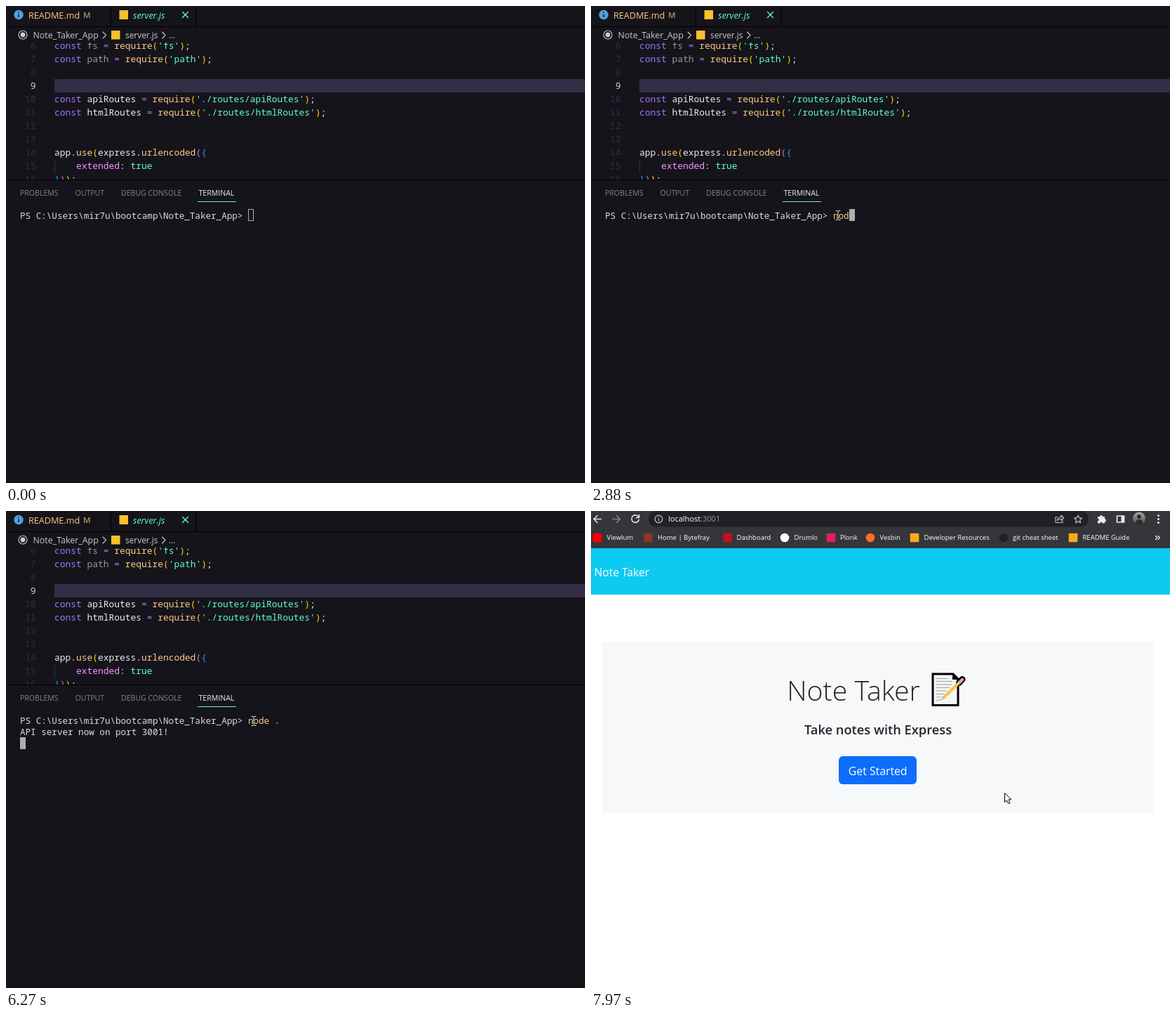
Animation of 825 by 679 pixels, one loop 8000 ms. Source, as an HTML page:

```html
<!DOCTYPE html>
<html lang="en">
<head>
<meta charset="utf-8">
<title>Note Taker demo</title>
<style>
html, body { margin: 0; width: 100%; height: 100%; overflow: hidden; background: #15141b; }
svg { display: block; width: 100vw; height: 100vh; }
text { white-space: pre; font-family: "Open Sans", "Noto Sans", sans-serif; }
.mono { font-family: "Noto Sans Mono", "DejaVu Sans Mono", monospace; font-weight: 500; }
.line { fill: none; stroke-linecap: round; stroke-linejoin: round; }
#code { font-size: 12.92px; }
#term { font-size: 12.6px; fill: #dddcde; }
#ibeam { mix-blend-mode: difference; }
</style>
</head>
<body>
<svg viewBox="0 0 825 679" preserveAspectRatio="none">
  <defs>
    <clipPath id="pane"><rect y="52" width="825" height="195"/></clipPath>
    <linearGradient id="photo" x2="0" y2="1"><stop stop-color="#a9a5a6"/><stop offset="1" stop-color="#5b4a4c"/></linearGradient>
  </defs>

  <g id="editor">
    <rect width="825" height="679" fill="#15141b"/>
    <path d="M0 29.5H825M149.5 0V29M270.5 0V29M0 247.5H825" stroke="#000"/>
    <circle cx="18" cy="12.5" r="6.7" fill="#4ea1e0"/>
    <path d="M18 11.5V16M18 8.3V9.8" stroke="#15141b" stroke-width="1.5"/>
    <g font-size="12.6">
      <text x="32" y="18" fill="#ffca85">README.md</text>
      <text x="110" y="17" font-size="11.5" font-weight="600" fill="#b59265">M</text>
      <text x="181" y="18" fill="#61ffca" font-style="italic">server.js</text>
    </g>
    <path d="M161.5 6h12.5v13h-12.5zM150 35h12.5v12.5H150z" fill="#fbc02d"/>
    <path class="line" d="M251.5 8.5l8 8m0-8l-8 8" stroke="#61ffca" stroke-width="1.3"/>
    <g font-size="11.9" fill="#cbcacc">
      <circle cx="24" cy="41" r="6" fill="none" stroke="#b9b8ba" stroke-width="1.2"/>
      <circle cx="24" cy="41" r="3.4"/>
      <text x="38.5" y="46" font-size="12.4">Note_Taker_App</text>
      <text x="170" y="46">server.js</text>
      <text x="232" y="46">...</text>
      <path class="line" d="M138 37l4.5 4.5l-4.5 4.5M222.5 37l4.5 4.5l-4.5 4.5" stroke="#cbcacc" stroke-width="1.1"/>
    </g>

    <g id="code" clip-path="url(#pane)">
      <rect x="69" y="104" width="756" height="19" fill="#312e46"/>
      <path d="M69.5 219V238" stroke="#34313f"/>
    </g>

    <g font-size="10.55" fill="#85848a">
      <text x="20" y="270">PROBLEMS</text>
      <text x="98.5" y="270">OUTPUT</text>
      <text x="164" y="270">DEBUG CONSOLE</text>
      <text x="274.5" y="270" fill="#edecee">TERMINAL</text>
    </g>
    <path d="M273 278.5H328" stroke="#61ffca"/>
    <g id="term">
      <rect id="caret" width="7" height="16" stroke="#aeafad"/>
      <text class="mono" x="20" y="302.5">PS C:\Users\mir7u\bootcamp\Note_Taker_App> <tspan id="cmd" fill="#ffca85"></tspan><tspan id="arg"></tspan></text>
      <text id="reply" class="mono" x="20" y="319">API server now on port 3001!</text>
    </g>
    <path id="ibeam" class="line" d="M-3 -6.5h2l1 1l1 -1h2M0 -5.5V5.5M-3 6.5h2l1 -1l1 1h2" stroke="#fff"/>
  </g>

  <g id="browser">
    <rect width="825" height="679" fill="#fff"/>
    <rect width="825" height="53" fill="#35363a"/>
    <rect x="82" y="0" width="627" height="22.5" rx="11.2" fill="#202124"/>
    <g class="line" stroke="#e8eaed" stroke-width="1.5">
      <path d="M14.5 11.5H4m5-5l-5 5l5 5"/>
      <path d="M31 11.5h10.5m-5-5l5 5l-5 5" stroke="#85868a"/>
      <path d="M67.5 8A5.3 5.3 0 1 0 68.3 12.5M68.5 5.5V9.5H64.5"/>
      <g stroke="#bdc1c6" stroke-width="1.2">
        <circle cx="96.5" cy="11.5" r="5.3"/>
        <path d="M96.5 11V14M96.5 8.5V9"/>
        <path d="M664 8.5h-2v8h10v-2.5M664.5 13.5c.5-3.5 3-5 5.5-5v-2.5l3.5 4l-3.5 3.5v-2.5c-2.5 0-4 .5-5.5 2.5"/>
        <path d="M694 6l1.6 3.7l4 .4l-3 2.7l.9 4l-3.5-2.1l-3.5 2.1l.9-4l-3-2.7l4-.4z"/>
      </g>
      <rect x="749.5" y="7" width="10" height="9" stroke-width="1.7"/>
    </g>
    <g fill="#e8eaed">
      <path d="M722 8h3a2 2 0 1 1 4 0h3v3.2a2 2 0 1 1 0 4v2.3h-3.3a1.7 1.7 0 0 0-3.4 0H722v-3.3a1.7 1.7 0 0 0 0-3.4zM755.5 7h4v9h-4z"/>
      <circle cx="808.5" cy="6.5" r="1.5"/><circle cx="808.5" cy="11.5" r="1.5"/><circle cx="808.5" cy="16.5" r="1.5"/>
    </g>
    <circle cx="781" cy="10.5" r="9" fill="url(#photo)"/>
    <path d="M775.5 18c0-8 11-8 11 0q-5.5 3-11 0" fill="#2f2a2e"/>
    <circle cx="781" cy="8" r="3" fill="#2f2a2e"/>
    <text x="110" y="15" font-size="11" fill="#fff">localhost<tspan fill="#9aa0a6">:3001</tspan></text>
    <g id="marks" font-size="9.5" font-weight="500" fill="#fff"></g>
    <path class="line" d="M804.5 35.5l2.5 2.5l-2.5 2.5m3.5-5l2.5 2.5l-2.5 2.5" stroke="#e8eaed" stroke-width="1.3"/>

    <rect y="53" width="825" height="66" fill="#0dcaf0"/>
    <text x="4.5" y="93" font-size="15.6" fill="#fff">Note Taker</text>
    <rect x="16" y="187" width="786" height="243" fill="#f7f8fa"/>
    <g text-anchor="middle" fill="#212529">
      <text x="374" y="270" font-size="39.3" font-weight="300">Note Taker</text>
      <text x="409" y="318" font-size="18.3" font-weight="600">Take notes with Express</text>
      <rect x="353" y="349" width="111" height="40" rx="6" fill="#0d6efd"/>
      <text x="408.7" y="376" font-size="15.8" fill="#fff">Get Started</text>
    </g>
    <path d="M487 232H516L523 239V276.5H487z" fill="#f4f4f4" stroke="#000" stroke-width="3"/>
    <path d="M515 231v9h8z"/>
    <path class="line" d="M492 238.5h16m-16 4h22m-22 4.500h22m-22 4.500h19m-19 4.500h15m-15 4.500h11m-11 4.500h7m-7 5q4-3 7-1" stroke="#9c9ea2"/>
    <g class="line">
      <path d="M524.5 244.5L529 239.5" stroke="#000" stroke-width="9"/>
      <path d="M503 265L525 244" stroke="#fcc43c" stroke-width="4.2"/>
      <path d="M525 244L526.5 242.5" stroke="#b8bcc0" stroke-width="4.2"/>
      <path d="M527.5 241.5L529 240" stroke="#f3a9a5" stroke-width="4.2"/>
    </g>
    <path d="M499 269l2.3-5.5l3.5 3.5z" fill="#e3b98a"/>
    <path id="arrow" d="M.5 .5V13.5L3.5 10.7L5.7 15.5L8 14.5L6 9.8H10z" fill="#fff" stroke="#000"/>
  </g>
</svg>
<script>
const $ = id => document.getElementById(id);
const make = (parent, tag, attrs, text = '') => {
  const el = document.createElementNS('http://www.w3.org/2000/svg', tag);
  for (const k in attrs) el.setAttribute(k, attrs[k]);
  el.textContent = text;
  return parent.appendChild(el);
};

// Code tokens: a colour letter, then the text, separated by "|"
const inks = { p: '#a277ff', g: '#61ffca', o: '#ffca85', w: '#edecee', d: '#99989d',
  y: '#ffd700', m: '#da70d6', b: '#179fff', k: '#f694ff' };
const load = (name, file, ink) =>
  `pconst |${ink}${name}|p = |orequire|y(|g'${file}'|y)|w;`;
const lines = {
  6: load('fs', 'fs', 'd'),
  7: load('path', 'path', 'd'),
  10: load('apiRoutes', './routes/apiRoutes', 'w'),
  11: load('htmlRoutes', './routes/htmlRoutes', 'w'),
  14: 'wapp.|ouse|y(|wexpress.|ourlencoded|m(|b{',
  15: 'k    extended|w: |gtrue',
  16: 'b}|m)|y)|w;'
};
for (let n = 6; n <= 16; n++) {
  const y = 118 + (n - 9) * 19.07;
  make($('code'), 'text', { class: 'mono', x: 42.5, y, 'text-anchor': 'end',
    fill: n === 9 ? '#d5d4d7' : '#312e46' }, n);
  if (!lines[n]) continue;
  const row = make($('code'), 'text', { class: 'mono', x: 69, y });
  for (const part of lines[n].split('|'))
    make(row, 'tspan', { fill: inks[part[0]] }, part.slice(1));
}

// Bookmarks: icon centre, text start, label, icon colour, round
[
  [9, 22.5, 'Viewlum', '#f00', 0],
  [81.5, 95, 'Home | Bytefray', '#8f3527', 0],
  [194.5, 207.5, 'Dashboard', '#c1121f', 0],
  [276, 289.5, 'Drumlo', '#fff', 1],
  [342, 355, 'Plonk', '#e01e5a', 0],
  [398, 411.5, 'Vesbin', '#fc6d26', 1],
  [461, 474.5, 'Developer Resources', '#fba81c', 0],
  [588, 601, 'git cheat sheet', '#202124', 1],
  [687, 700.5, 'README Guide', '#fba81c', 0]
].forEach(([cx, x, label, fill, round]) => {
  make($('marks'), 'rect', { x: cx - 6.3, y: 31.7, width: 12.6, height: 12.6, rx: round ? 6.3 : 1, fill });
  make($('marks'), 'text', { x, y: 41 }, label);
});

const show = (id, on) => { $(id).style.display = on ? '' : 'none'; };

// Follows [time, x, y] keys, easing between each pair
function follow(id, t, keys, ease) {
  let i = 0;
  while (i < keys.length - 2 && t >= keys[i + 1][0]) i++;
  const [a, b] = [keys[i], keys[i + 1]];
  const u = ease(Math.min(1, Math.max(0, (t - a[0]) / (b[0] - a[0]))));
  const at = j => a[j] + (b[j] - a[j]) * u;
  $(id).setAttribute('transform', `translate(${at(1)} ${at(2)})`);
}
const easeOut = u => 1 - (1 - u) ** 2;
const smooth = u => u * u * (3 - 2 * u);

const keyTimes = [2420, 2620, 2880, 3150, 3480, 3680];
const enter = [[70, 653, 473], [870, 394, 300], [1150, 345, 295], [1490, 352, 298]];
const leave = [[6270, 353, 299], [6960, 733, 677]];
const arrive = [[7550, 734, 668], [7970, 589, 401]];

function draw(t) {
  const typed = 'node .'.slice(0, keyTimes.filter(k => t >= k).length);
  $('cmd').textContent = typed.slice(0, 4);
  $('arg').textContent = typed.slice(4);
  show('reply', t >= 4550);

  const [x, y] = t < 4350 ? [345 + 7.56 * typed.length, 289] : [20, t < 4550 ? 305 : 322];
  $('caret').setAttribute('x', Math.round(x) + .5);
  $('caret').setAttribute('y', y + .5);
  $('caret').setAttribute('fill', t >= 1490 && t < 7290 ? '#aeafad' : 'none');

  show('ibeam', t >= 70 && t < 6960);
  if (t < 6270) follow('ibeam', t, enter, easeOut);
  else follow('ibeam', t, leave, smooth);

  show('editor', t < 7360);
  show('browser', t >= 7360);
  show('arrow', t >= 7550);
  follow('arrow', t, arrive, easeOut);
}

const start = performance.now();
function frame(now) {
  draw(Math.max(0, now - start) % 8000);
  requestAnimationFrame(frame);
}
draw(0);
requestAnimationFrame(frame);
</script>
</body>
</html>
```
